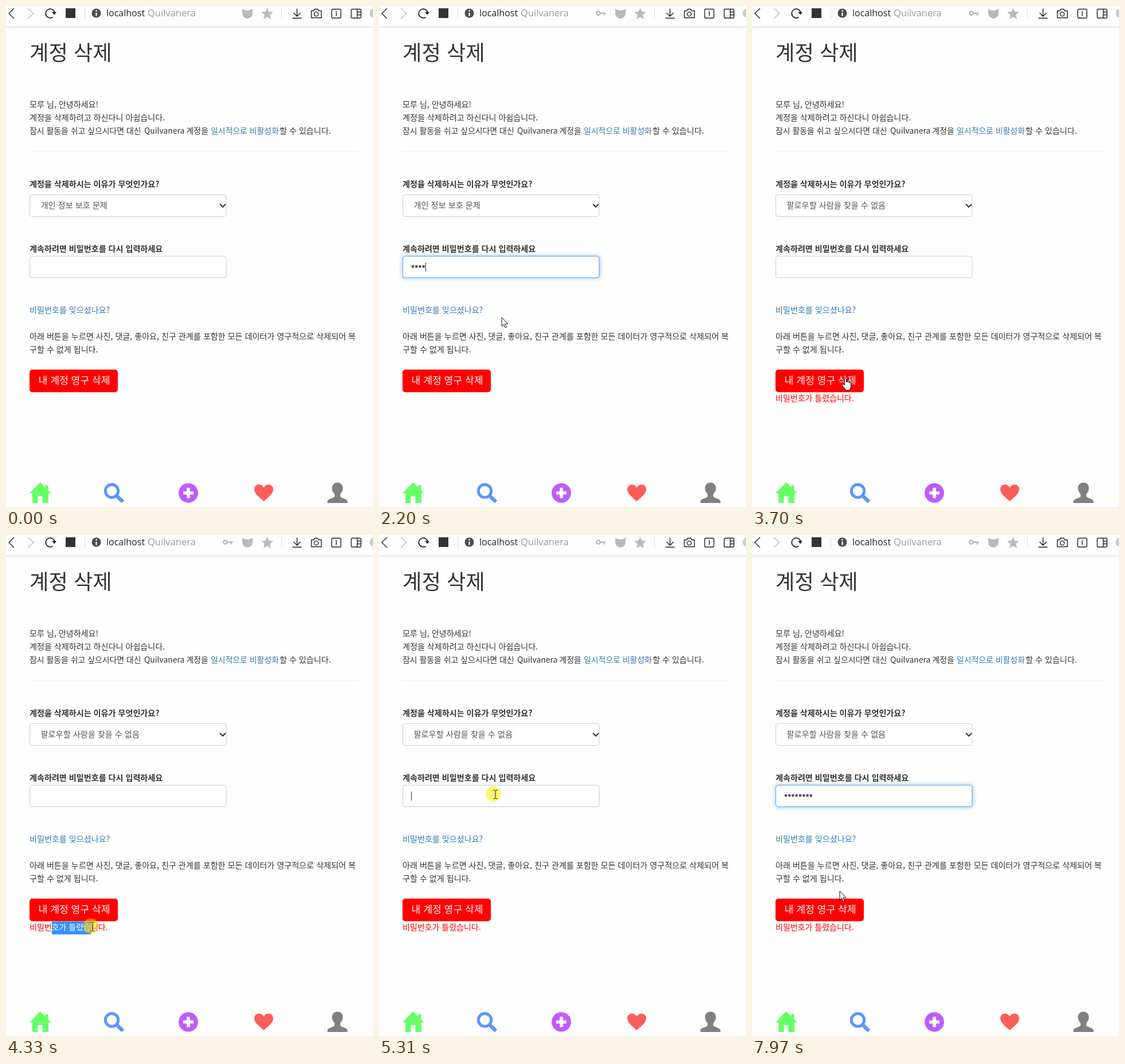
Animation, 640 px wide and 875 px high, one loop 8000 ms. Source, as an HTML page:

```html
<!DOCTYPE html>
<html lang="ko">
<head>
<meta charset="utf-8">
<title>계정 삭제</title>
<style>
html, body { margin: 0; width: 100%; height: 100%; overflow: hidden; background: #fefefe; }
svg { display: block; width: 100vw; height: 100vh; }
text { font: 14.1px "Noto Sans CJK KR", "Noto Sans KR", sans-serif; fill: #333; }
.title { font-size: 36.3px; }
.bold { font-weight: 700; }
.small { font-size: 13.9px; }
.link { fill: #337ab7; }
.url { font: 16px "Open Sans", "Noto Sans", sans-serif; fill: #222; }
.path { font-size: 16.5px; fill: #999; }
.option { font-size: 14.2px; fill: #555; }
.button { font-size: 17.2px; fill: #fff; }
.error { font-size: 14px; fill: #f00; }
.picked { fill: #fff; }
.line { fill: none; stroke: #222; stroke-width: 1.4; }
.heavy { stroke-width: 1.8; }
.off { stroke: #bbb; }
.box { fill: #fff; stroke: #ccc; }
.grey { fill: #bababa; }
</style>
</head>
<body>
<svg viewBox="0 0 640 875">
  <defs>
    <filter id="blur" x="-10%" y="-60%" width="120%" height="220%"><feGaussianBlur stdDeviation="3.5"/></filter>
    <clipPath id="selClip"><rect id="selArea" x="80" y="675" width="0" height="22.5"/></clipPath>
  </defs>

  <!-- toolbar -->
  <path d="M0 36.5H640" stroke="#d4d4d4"/>
  <path class="line" d="M14 4 5 13l9 9"/>
  <path class="line off" d="M38 4l10 9-10 9"/>
  <g id="reload">
    <path class="line heavy" d="M81.5 19.4A7.8 7.8 0 1 1 84.6 11"/>
    <path d="M80 10.5h8l-3.6 5z" fill="#222"/>
  </g>
  <path id="stop" class="line heavy" d="M71 6l14 14M85 6 71 20"/>
  <rect x="104" y="4" width="17" height="17" fill="#333"/>
  <path d="M137.5 4v18M480.5 4v18" stroke="#ddd"/>
  <circle cx="157.5" cy="12.5" r="8" fill="#4c4c4c"/>
  <path d="M157.5 11.5v6M157.5 7v2.4" stroke="#fff" stroke-width="2.2"/>
  <text class="url" x="175" y="18">localhost</text>
  <text class="url path" x="247" y="18">Quilvanera</text>
  <g id="key" fill="none" stroke="#bababa" stroke-width="2.4">
    <circle cx="382.5" cy="12.5" r="3.2"/>
    <path d="M386 12.5h9.5M392.5 12.5v4"/>
  </g>
  <path class="grey" d="M412 5q4.5 3 9 3t9-3v8q0 7-9 9-9-2-9-9z"/>
  <path class="grey" d="M455.5 3l3 7 7.5.6-5.7 5 1.7 7.4-6.5-4-6.5 4 1.7-7.4-5.7-5 7.5-.6z"/>
  <path class="line" d="M507.5 4.5v13M501.500 12l6 6 6-6M499.5 21.3h16"/>
  <path class="line" d="M532.5 8.5h4l2-3h5l2 3h4.5v12h-17.500z"/>
  <circle class="line" cx="541" cy="14" r="3.6"/>
  <rect class="line" x="568" y="5.5" width="16" height="15.5" rx="2"/>
  <path class="line" d="M576 9v8.5"/>
  <rect class="line" x="602" y="5.5" width="17" height="15.5" rx="2"/>
  <path class="line" d="M612.5 5.5V21M612.5 10.5h6.5M612.5 15.5h6.5"/>
  <circle cx="642" cy="12.5" r="8" fill="#ccc"/>

  <!-- page -->
  <text class="title" x="41" y="95">계정 삭제</text>
  <text x="41" y="177">모루 님, 안녕하세요!</text>
  <text x="41" y="200">계정을 삭제하려고 하신다니 아쉽습니다.</text>
  <text class="small" x="41" y="223">잠시 활동을 쉬고 싶으시다면 대신</text>
  <text class="small" x="241" y="223">Quilvanera</text>
  <text class="small" x="314.5" y="223">계정을</text>
  <text class="small link" x="357" y="223">일시적으로 비활성화</text>
  <text x="477" y="223">할 수 있습니다.</text>
  <path d="M41 254H614" stroke="#eee"/>

  <text class="bold" x="41" y="316">계정을 삭제하시는 이유가 무엇인가요?</text>
  <rect class="box" x="41.5" y="329.5" width="342.5" height="38" rx="4"/>
  <text id="reason" class="option" x="60.5" y="352.5"></text>
  <path d="M373 346l5 5 5-5" fill="none" stroke="#333" stroke-width="2"/>

  <text class="bold" x="41" y="429">계속하려면 비밀번호를 다시 입력하세요</text>
  <rect id="glow" x="40" y="436" width="346" height="40" rx="5" fill="#66afe9" filter="url(#blur)"/>
  <rect class="box" x="41.5" y="437" width="342.5" height="37.5" rx="4"/>
  <rect id="ring" x="41.5" y="437" width="342.5" height="37.5" rx="4" fill="none" stroke="#66afe9"/>
  <g id="dots" fill="#555"></g>
  <rect id="caret" y="448" width="1" height="16" fill="#333"/>

  <text class="link" x="41" y="536">비밀번호를 잊으셨나요?</text>
  <text x="41" y="582">아래 버튼을 누르면 사진, 댓글, 좋아요, 친구 관계를 포함한 모든 데이터가 영구적으로 삭제되어 복</text>
  <text x="41" y="605">구할 수 없게 됩니다.</text>

  <rect x="41" y="635" width="154" height="39.5" rx="5" fill="#f00"/>
  <g id="outline" fill="none">
    <rect x="39.5" y="633.5" width="157" height="42.5" rx="6" stroke="#ddd"/>
    <rect x="42" y="636" width="152" height="37.5" rx="4" stroke="#101010" stroke-width="2"/>
  </g>
  <text class="button" x="56.5" y="660">내 계정 영구 삭제</text>
  <g id="error">
    <text class="error" x="41" y="690">비밀번호가 틀렸습니다.</text>
    <g clip-path="url(#selClip)">
      <rect x="80" y="675" width="70" height="23" fill="#3390ff"/>
      <text class="error picked" x="41" y="690">비밀번호가 틀렸습니다.</text>
    </g>
  </g>

  <!-- bottom bar -->
  <path fill="#6f6" d="M59.5 832l9 8.8V837h5v8.800l5 5.200H74v17H63.500V856h-8v12H46v-17h-5z"/>
  <g fill="none" stroke="#5c94ff">
    <circle cx="184.5" cy="847" r="11.2" stroke-width="5"/>
    <path d="M193 855.500l11 10.500" stroke-width="6.5"/>
  </g>
  <circle cx="318" cy="850.5" r="17" fill="#bd5cff"/>
  <path d="M318 841.5v18M309 850.5h18" stroke="#fff" stroke-width="5.6"/>
  <path fill="#ff5c5c" d="M449.5 865C441 857 433 852 433 844c0-9 12-11.5 16.5-3 4.5-8.5 16.5-6 16.5 3 0 8-8 13-16.5 21z"/>
  <path fill="#808080" d="M578 832.5c6 0 9.5 4 9.5 9.5 0 5-2.5 8-4.5 10.5v4.5c2 2.5 12.5 4 12.5 8v3h-35v-3c0-4 10.5-5.5 12.5-8v-4.5c-2-2.5-4.5-5.5-4.5-10.500 0-5.500 3.500-9.500 9.500-9.500z"/>

  <!-- pointer -->
  <g id="pointer">
    <circle id="press" cx="-3" cy="-1" r="13.5" fill-opacity=".55"/>
    <path id="arrow" d="M0 0v15.5l3.6-3.3 2.5 5.6 2.3-1-2.5-5.5h5z" fill="#fff" stroke="#111"/>
    <path id="beam" d="M-3.5-7.5h2.5l1 1 1-1h2.5M0-6.5v13M-3.5 7.5h2.5l1-1 1 1h2.5" fill="none" stroke="#111"/>
    <path id="hand" d="M-1.7 10V1.500C-1.7-.5 1.5-.5 1.5 1.5V7c.5-1.5 3-1.2 3 .5.6-1.2 2.7-1 2.8.6.7-1 2.2-.6 2.2 1v5.4c0 3-1.5 4-2 6.5H0c-.5-3-4-5.5-5.7-8.5-.9-2 1.5-3 4-.5z" fill="#fff" stroke="#111"/>
  </g>
</svg>
<script>
const LOOP = 8000, FADE = 150, BLINK = 530;
const FOCUS = 690, BLUR = 2700, FAILED = 3070, REFOCUS = 5300;
const GLYPH = 13.6, DOT = 6.25;

const start = { x: 535, y: 858 };
const moves = [
  { from: 110, to: 620, x: 227, y: 472 },
  { from: 1780, to: 2200, x: 214, y: 544 },
  { from: 2200, to: 2560, x: 171, y: 646 },
  { from: 3630, to: 4010, x: 79, y: 688 },
  { from: 4040, to: 4330, x: 151, y: 684 },
  { from: 4470, to: 4580, x: 312, y: 715 },
  { from: 4880, to: 5230, x: 203, y: 453 },
  { from: 7900, to: 7970, x: 153, y: 622 }
];
const clicks = [
  { down: 680, up: 840 }, { down: BLUR, up: 2840 }, { down: 4010, up: 4470 },
  { down: 4600, up: 4700 }, { down: 5240, up: 5460 }
];
const first = { start: 1180, gap: 180, count: 4 };
const second = { start: 6070, gap: 177, count: 8 };

const $ = id => document.getElementById(id);
const set = (id, name, value) => $(id).setAttribute(name, value);
const show = (id, on) => $(id).style.display = on ? "" : "none";
const clamp = (v, max = 1) => Math.min(max, Math.max(0, v));
const within = (t, a, b) => t >= a && t < b;
const fade = (t, at) => clamp((t - at) / FADE);
const ease = k => k * k * (3 - 2 * k);

function position(t) {
  let { x, y } = start;
  for (const m of moves) {
    const k = ease(clamp((t - m.from) / (m.to - m.from)));
    x += (m.x - x) * k;
    y += (m.y - y) * k;
  }
  return [x, y];
}

function pointerKind(x, y) {
  const over = (l, t, r, b) => x >= l && x <= r && y >= t && y <= b;
  if (over(41, 635, 195, 674)) return "hand";
  if (over(41, 437, 385, 475) || over(41, 675, 178, 698)) return "beam";
  return "arrow";
}

// Characters typed so far and whether the caret is lit; each key restarts the blink.
function typing(t) {
  const again = t >= REFOCUS;
  const run = again ? second : first;
  const erased = within(t, FAILED, REFOCUS);
  const count = erased ? 0 : clamp(Math.floor((t - run.start) / run.gap) + 1, run.count);
  const last = count ? run.start + (count - 1) * run.gap : again ? REFOCUS : FOCUS;
  const focused = again || within(t, FOCUS, BLUR);
  return { count, lit: focused && (t - last) % (2 * BLINK) < BLINK };
}

function selection(t) {
  if (!within(t, 4040, 4600)) return 0;
  const [x] = position(Math.min(t, 4400));
  return Math.max(0, Math.round((x - 80) / GLYPH)) * GLYPH;
}

for (let i = 0; i < second.count; i++) {
  const dot = document.createElementNS("http://www.w3.org/2000/svg", "circle");
  dot.setAttribute("cx", 59 + DOT * i);
  dot.setAttribute("cy", 455);
  dot.setAttribute("r", 2.4);
  $("dots").append(dot);
}

function drawPointer(t) {
  const [x, y] = position(t);
  const kind = pointerKind(x, y);
  show("pointer", t >= moves[0].from);
  set("pointer", "transform", `translate(${Math.round(x)} ${Math.round(y)})`);
  for (const id of ["arrow", "beam", "hand"]) show(id, id === kind);

  const click = clicks.find(c => within(t, c.down, c.up));
  show("press", click);
  if (click) set("press", "fill", `hsl(${60 - clamp((t - click.down) / 25, 12)} 100% 50%)`);
}

function drawField(t) {
  const focus = fade(t, FOCUS) - fade(t, BLUR) + fade(t, REFOCUS);
  set("glow", "opacity", focus * 0.6);
  set("ring", "opacity", focus);

  const { count, lit } = typing(t);
  [...$("dots").children].forEach((dot, i) => dot.style.display = i < count ? "" : "none");
  set("caret", "x", Math.floor(56 + DOT * count));
  show("caret", lit);
}

function render(t) {
  const failed = t >= FAILED;
  const loading = within(t, 2820, 3130);
  drawField(t);
  drawPointer(t);
  $("reason").textContent = failed ? "팔로우할 사람을 찾을 수 없음" : "개인 정보 보호 문제";
  show("error", failed);
  set("selArea", "width", selection(t));
  show("outline", within(t, 2760, FAILED));
  show("key", t >= first.start);
  show("stop", loading);
  show("reload", !loading);
}

function tick() {
  render(performance.now() % LOOP);
  requestAnimationFrame(tick);
}
tick();
</script>
</body>
</html>
```
